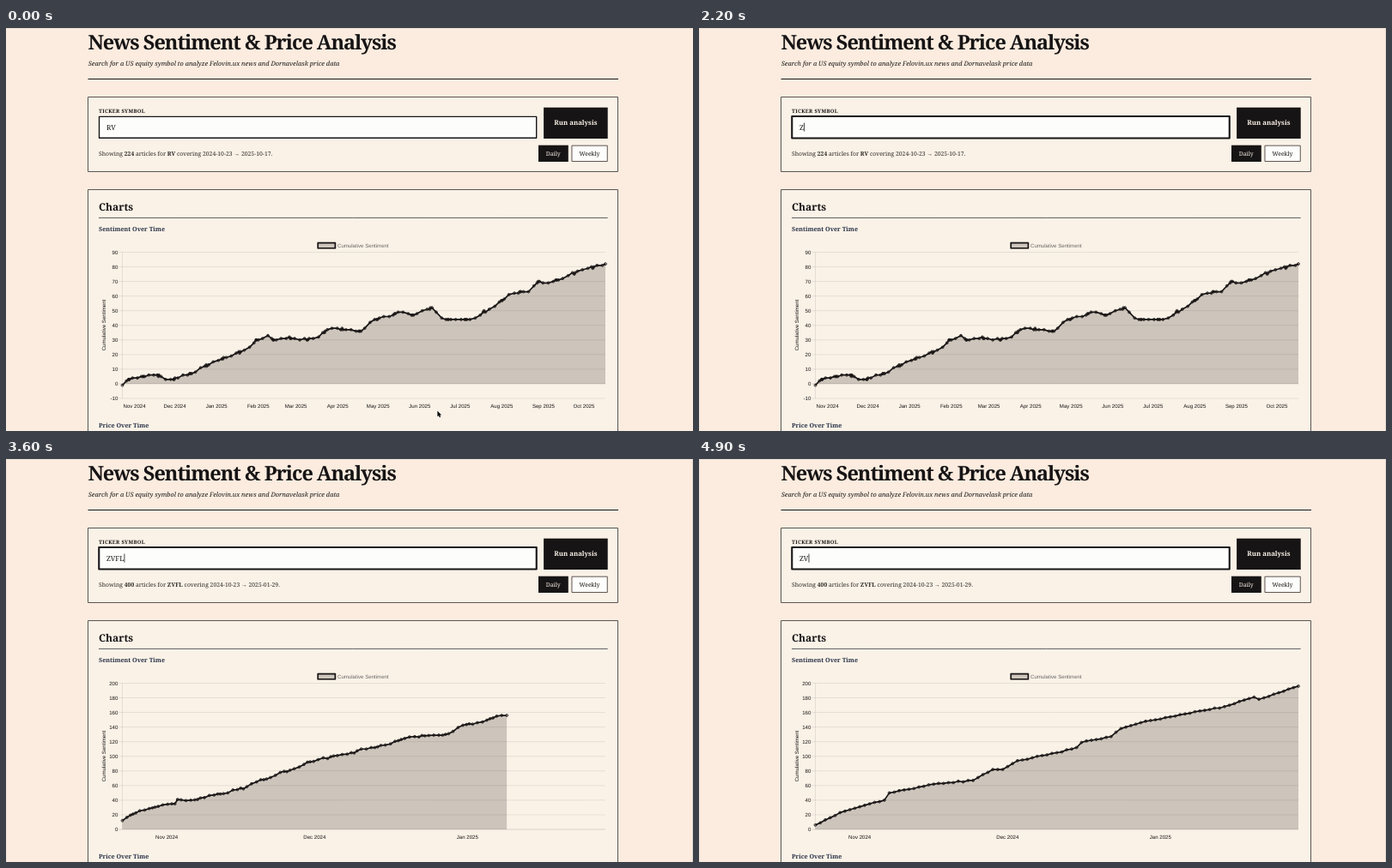
These frames come from a looping animation (800 by 470 pixels, 5 s). An HTML page with a canvas:

```html
<!DOCTYPE html>
<html lang="en">
<head>
<meta charset="utf-8">
<title>News Sentiment</title>
<style>
  html, body { margin: 0; width: 100%; height: 100%; overflow: hidden; background: #fbecdf; }
  canvas { display: block; width: 800px; height: 470px; }
</style>
</head>
<body>
<canvas id="stage" width="800" height="470"></canvas>
<script>
const ctx = document.getElementById('stage').getContext('2d');
ctx.textRendering = 'geometricPrecision';

const LOOP = 5000, STEP = 100;
const SERIF = '"Noto Serif", "Liberation Serif", serif';
const SMALL = '6.1px "Liberation Sans", Arial, sans-serif';
const INK = '#171415', PAGE = '#fbecdf', PANEL = '#faf2e7', WHITE = '#fdfefc';
const FILL = 'rgba(26,18,10,.2)', EDGE = '#5a5552', GRID = 'rgba(0,0,0,.12)';
const LEFT = 135.5, RIGHT = 698, TOP = 261.5, BOTTOM = 432;

const mix = (a, b, p) => a + (b - a) * p;
const clamp = v => Math.min(1, Math.max(0, v));
const smooth = v => { v = clamp(v); return v * v * (3 - 2 * v); };

// Turning points of both trends: day, cumulative score
const YEAR = {
  days: 359, min: -10, max: 90, step: 10, months: 12,
  trend: [[0, -1], [4, 3], [22, 6], [30, 5], [33, 2], [53, 8], [70, 16], [94, 24], [98, 29],
    [109, 33], [112, 30], [121, 32], [132, 30], [144, 31], [154, 38], [178, 36], [185, 43],
    [207, 49], [215, 47], [230, 52], [239, 44], [259, 44], [276, 53], [289, 62], [302, 63],
    [309, 70], [315, 68], [339, 77], [359, 82]]
};
const QUARTER = {
  days: 98, min: 0, max: 200, step: 20, months: 3,
  trend: [[0, 6], [5, 23], [9, 31], [14, 40], [15, 50], [24, 62], [32, 67], [36, 82], [38, 82],
    [41, 94], [49, 105], [53, 112], [54, 119], [60, 127], [62, 138], [66, 146], [83, 168],
    [89, 181], [90, 178], [98, 196]]
};

function random(seed) {
  return () => (seed = seed * 16807 % 2147483647) / 2147483647;
}

function valueAt(trend, day) {
  const k = Math.max(1, trend.findIndex(([d]) => d >= day));
  const [d0, v0] = trend[k - 1], [d1, v1] = trend[k];
  return mix(v0, v1, (day - d0) / (d1 - d0));
}

const scaleX = (set, day) => mix(LEFT, RIGHT, day / set.days);
const scaleY = (set, v) => mix(BOTTOM, TOP, (v - set.min) / (set.max - set.min));

// Scores are whole numbers, so a slight wobble turns the trend into steps.
function plot(set, count, dayOf) {
  const rnd = random(77);
  return Array.from({ length: count + 1 }, (_, i) => {
    const day = Math.min(set.days, Math.max(0, dayOf(i)));
    const score = Math.round(valueAt(set.trend, day) + (rnd() - .5) * .8);
    return [scaleX(set, day), scaleY(set, score)];
  });
}

// Yearly news comes in bunches, which the sine pulls together.
const yearly = plot(YEAR, 161, i => 359 * (i / 161) ** 1.07 + 1.7 * Math.sin(i * 1.1));
const latest = plot(QUARTER, 98, i => i);

function text(str, x, y, font, color = INK, align = 'left') {
  ctx.font = font;
  ctx.fillStyle = color;
  ctx.textAlign = align;
  ctx.fillText(str, x, y);
  return ctx.measureText(str).width;
}

function box(x0, y0, x1, y1, fill, line = 0, color = INK) {
  ctx.fillStyle = fill;
  ctx.fillRect(x0, y0, x1 - x0, y1 - y0);
  if (!line) return;
  ctx.lineWidth = line;
  ctx.strokeStyle = color;
  ctx.strokeRect(x0 + line / 2, y0 + line / 2, x1 - x0 - line, y1 - y0 - line);
}

function rule(x0, y0, x1, y1, width, color) {
  ctx.lineWidth = width;
  ctx.strokeStyle = color;
  ctx.beginPath();
  ctx.moveTo(x0, y0);
  ctx.lineTo(x1, y1);
  ctx.stroke();
}

function page(t) {
  box(0, 0, 800, 470, PAGE);
  rule(0, .5, 800, .5, 1, '#e6dcd2');
  if (t >= 700) {
    rule(.5, 0, .5, 470, 1, '#eee2d7');
    rule(799.5, 0, 799.5, 470, 1, '#e0d6cc');
  }
  ctx.letterSpacing = '-1.05px';
  text('News Sentiment & Price Analysis', 95.4, 25.4, 'bold 23.5px ' + SERIF);
  ctx.letterSpacing = '0px';
  text('Search for a US equity symbol to analyze Felovin.ux news and Dornavelask price data',
    95.8, 43.6, 'italic 7.38px ' + SERIF);
  rule(95.5, 59.5, 713, 59.5, 1.2, INK);
  box(95, 80, 713, 168, PANEL, 1, EDGE);
  box(95, 188, 713, 480, PANEL, 1, EDGE);
}

const typing = [[0, 'RV'], [1500, 'R'], [1700, ''], [2000, 'Z'], [2400, 'ZV'], [2600, 'ZVF'],
  [2800, 'ZVFL'], [4500, 'ZVF'], [4700, 'ZV']];

function form(t, loaded) {
  const busy = t >= 3200 && !loaded, focus = t >= 800;
  const edge = busy ? 630.6 : 618.4;
  ctx.letterSpacing = '.3px';
  text('TICKER SYMBOL', 108, 98.9, 'bold 5.98px ' + SERIF);
  ctx.letterSpacing = '0px';

  if (focus) box(107.2, 102, edge + .4, 129.6, WHITE, 2.1);
  else box(107.8, 102.7, edge, 129, WHITE, 1.4);
  const typed = typing.findLast(([from]) => t >= from)[1];
  const caret = 117.6 + text(typed, 117, 118.5, '8.2px ' + SERIF);
  if (focus) rule(caret, 110.6, caret, 120.6, .8, INK);

  const left = busy ? 638.2 : 626.1, right = 700.7;
  box(left, 92.7, right, 129, busy ? '#3c3a39' : INK);
  text(busy ? 'Loading...' : 'Run analysis', (left + right) / 2, 113.3,
    '600 7.8px ' + SERIF, PANEL, 'center');

  box(620, 136.7, 654.8, 156, INK);
  text('Daily', 637.2, 148.9, '500 6.8px ' + SERIF, PANEL, 'center');
  box(658.5, 136.7, right, 156, WHITE, .9, '#4b3d38');
  text('Weekly', 679.5, 148.9, '500 6.8px ' + SERIF, INK, 'center');

  const parts = ['Showing ', loaded ? '400' : '224', ' articles for ', loaded ? 'ZVFL' : 'RV',
    ' covering 2024-10-23 → ' + (loaded ? '2025-01-29.' : '2025-10-17.')];
  let x = 108;
  parts.forEach((part, i) => {
    x += text(part, x, 149, (i % 2 ? 'bold ' : '') + '6.8px ' + SERIF, '#2b2726');
  });
}

function axes(set) {
  for (let v = set.min; v <= set.max; v += set.step) {
    const y = scaleY(set, v);
    rule(131.5, y, RIGHT, y, .7, v ? GRID : 'rgba(0,0,0,.2)');
    text(String(v), 130.4, y + 2.2, SMALL, INK, 'right');
  }
  rule(LEFT, TOP, LEFT, BOTTOM, .7, GRID);

  for (let i = 0; i < set.months; i++) {
    const first = new Date(Date.UTC(2024, 10 + i, 1));
    const name = first.toLocaleString('en-US', { month: 'short', timeZone: 'UTC' });
    const day = (first - Date.UTC(2024, 9, 23)) / 864e5;
    text(name + ' ' + first.getUTCFullYear(), scaleX(set, day), 443.2, SMALL, INK, 'center');
  }

  ctx.save();
  ctx.translate(116.2, 346.5);
  ctx.rotate(-Math.PI / 2);
  text('Cumulative Sentiment', 0, 0, SMALL, INK, 'center');
  ctx.restore();

  box(362.4, 249.7, 384.2, 257.6, FILL, 1.7);
  text('Cumulative Sentiment', 386, 255.9, SMALL, '#666');
}

function series(points, base) {
  const line = new Path2D();
  points.forEach(([x, y]) => line.lineTo(x, y));
  const area = new Path2D(line);
  area.lineTo(points[points.length - 1][0], base);
  area.lineTo(points[0][0], base);
  ctx.fillStyle = FILL;
  ctx.fill(area);

  ctx.strokeStyle = INK;
  ctx.lineJoin = 'round';
  ctx.lineWidth = 1.7;
  ctx.stroke(line);
  ctx.lineWidth = .8;
  for (const [x, y] of points) {
    ctx.beginPath();
    ctx.arc(x, y, 1.45, 0, 2 * Math.PI);
    ctx.fill();
    ctx.stroke();
  }
}

function chart(t, loaded) {
  const set = loaded ? QUARTER : YEAR;
  text('Charts', 108, 213.4, 'bold 12px ' + SERIF);
  rule(108, 221.4, 700.7, 221.4, .9, '#4a4a50');
  text('Sentiment Over Time', 108, 237.3, 'bold 7.15px ' + SERIF, '#2a3348');
  text('Price Over Time', 108, 465.6, 'bold 7.15px ' + SERIF, '#2a3348');
  axes(set);
  // Every dot travels from its old place to its new one.
  const p = 1 - (1 - clamp((t - 3441) / 1000)) ** 4;
  const moved = ([x, y], i) => [mix(yearly[i][0], x, p), mix(yearly[i][1], y, p)];
  series(loaded ? latest.map(moved) : yearly, scaleY(set, 0));
}

function pointer(t) {
  if (t >= 1500) return;
  const x = mix(502.4, 139.1, smooth((t - 50) / 710));
  const y = mix(446.5, 115.7, smooth((t - 50) / 590));
  const arrow = new Path2D('M0 0V6.8L1.5 5.4L2.5 7.8L3.7 7.3L2.7 4.9H4.8Z');
  ctx.save();
  ctx.translate(x, y);
  ctx.lineWidth = 1;
  ctx.strokeStyle = '#fff';
  ctx.stroke(arrow);
  ctx.fillStyle = '#000';
  ctx.fill(arrow);
  ctx.restore();
}

function draw(t) {
  const loaded = t >= 3500;
  page(t);
  form(t, loaded);
  chart(t, loaded);
  pointer(t);
}

const begin = performance.now();
function tick() {
  const t = (performance.now() - begin) % LOOP;
  draw(Math.floor(t / STEP) * STEP);
  requestAnimationFrame(tick);
}
tick();
</script>
</body>
</html>
```
